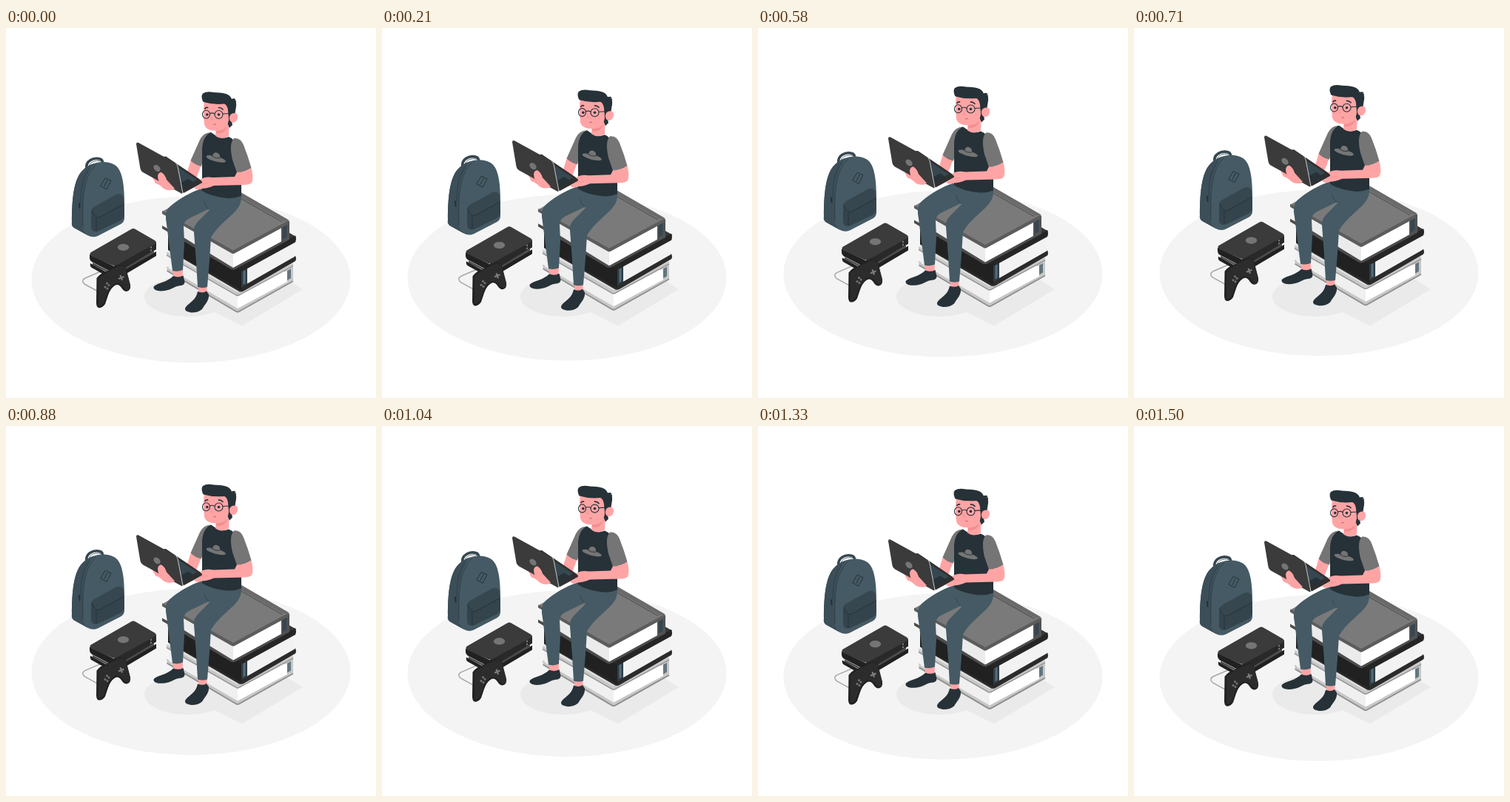
An HTML page that plays this animation: 500 px wide and 500 px high, repeating every 1.54 s.

```html
<!DOCTYPE html>
<html lang="en">
<head>
<meta charset="utf-8">
<title>Reader on a stack of books</title>
<style>
  html, body { margin: 0; width: 100%; height: 100%; overflow: hidden; background: #fff; }
  svg { display: block; width: 100%; height: 100%; }
  .ink { fill: #263238; }
  .skin { fill: #ffa4a5; }
  .denim { fill: #455a64; }
  .slate { fill: #37474f; }
  .grey { fill: #757575; }
  .line { fill: none; stroke: #263238; stroke-linecap: round; stroke-linejoin: round; }
</style>
</head>
<body>
<svg viewBox="0 0 500 500">
  <g class="float"><ellipse cx="250" cy="340" rx="215.5" ry="112.3" fill="#f4f4f4"/></g>

  <g fill="#eaeaea">
    <ellipse cx="245" cy="363" rx="58" ry="27"/>
    <path d="M270 378 L319 402.500 L401 353 L380 340 L290 340Z"/>
  </g>

  <g class="float">
    <g id="backpack">
      <path class="line" d="M109 190 C107 180 118 174.500 127 177 Q131 178 131 185" style="stroke:#37474f;stroke-width:3.600"/>
      <path class="line" d="M112 188 C112 181 121 178 128 180" style="stroke:#607078;stroke-width:1"/>
      <path class="denim" d="M89 262 C89 234 91 205 103 193 C115 180 135 178 147 185 C158 192 160 214 160 238 L160 257 Q160 262 155 265 L124 281 Q117 284 110 280 L92 270 Q88 267 89 262Z"/>
      <path d="M89 262 C89 234 91 205 103 193 Q110 186 119 183 C107 198 104 217 104 240 L104 269 Q105 277 112 281 L92 270 Q88 267 89 262Z" fill="#3c4e58"/>
      <path class="line" d="M104 268 C103 231 104 202 121 185 M101 237 C101 215 104 201 113 190" stroke-width=".9" style="stroke:#2e3e47"/>
      <path class="line" d="M99 237 L99.500 243" stroke-width="2.200"/>
      <path d="M115 251 Q115 245 120 242 L149 226 Q157 223 159 229 L160 251 Q160 257 155 260 L126 274 Q116 278 115 269Z" fill="#34444c"/>
      <path class="slate" d="M115 247 Q116 243 120 241 L149 225 Q157 222 159 231 L159 238 L127 255 Q122 257 119 252Z"/>
      <path class="line" d="M116 247 Q121 260 128 255 L159 238 M122 258 L122 274" stroke-width="1"/>
      <path class="line" d="M134.500 203 L142 206.500 L136 218 L128 213.500Z M137 206 L133 214" stroke-width="1"/>
    </g>

    <g id="console">
      <path class="line" d="M128 329 L107 338 Q101 341 106 346 L126 357" style="stroke:#a6a6a6;stroke-width:1.500"/>
      <path d="M114 318 L145 335 L203 302 L203 308 L149 340 Q145 341 141 338 L116 324 Q113 322 114 318Z" fill="#212121"/>
      <path d="M117 317 L146 332 L200 301 L200 304 L147 335 L117 320Z" fill="#4a4a4a"/>
      <path d="M113 306 L146 322 L203 290 L203 299 L149 331 Q146 332 143 330 L116 316 Q113 314 113 311Z" fill="#212121"/>
      <path d="M146 321 L203 290 L203 299 L149 331 L146 331Z" fill="#292929"/>
      <path d="M115 303 L169 272 Q172 270 175 272 L201 287 Q205 290 201 292 L150 320 Q146 322 142 320 L115 308 Q112 305 115 303Z" fill="#3b3b3b"/>
      <ellipse cx="158.500" cy="296.300" rx="7.700" ry="4.600" class="grey"/>
      <path d="M195 296 l2 -1 v2 l-2 1z m0 4 l2 -1 v2 l-2 1z" fill="#858585"/>
    </g>

    <g id="gamepad">
      <path d="M122.500 338 Q128 331 134 330 L151 321 Q159 318 162 324 L168 347 Q169 355 163 356 Q159 356 156 351 Q152 345 147 348 Q141 352 138 361 L134 373 Q130 379 125 378 Q122 377 122 371Z" fill="#212121"/>
      <path d="M125 338 Q138 328 152 322 Q160 319 162 326 L167 345 Q169 352 164 354 Q160 353 157 348 Q151 343 146 346 Q139 351 136 360 L132 371 Q129 376 125 375Z" fill="#2c2c2c"/>
      <path d="M152 339 L159.500 336 M154.500 334 L157 341" stroke="#7d7d7d" stroke-width="2.200"/>
      <g class="grey">
        <circle cx="136.500" cy="345" r="1.500"/><circle cx="134" cy="350" r="1.500"/>
        <circle cx="139" cy="347.500" r="1.500"/><circle cx="137" cy="352" r="1.500"/>
      </g>
    </g>

    <g id="books">
      <!-- bottom -->
      <path d="M217 322 L313 378 L388 338 L388 343 L315 384 Q313 385 311 384 L218 329Z" fill="#c7c7c7"/>
      <path d="M217.500 328 L311 383 Q313 384 315 383 L388 342" fill="none" stroke="#8f8f8f" stroke-width="1.800"/>
      <path d="M220 310 L313 361 V379 L220 325Z" fill="#f0f0f0"/>
      <path d="M313 361 L380 325 V343 L313 379Z" fill="#fff"/>
      <path d="M376 324 L388 318 V341 L380 345 V340 L384 336 V326 L376 330Z" fill="#c7c7c7"/>
      <path d="M380 328 L385 325.500 V338 L380 341Z" fill="#64757e"/>
      <path d="M217 303 L292 265 L388 319 L313 358Z" fill="#e0e0e0"/>
      <path d="M217 303 L313 357 L388 318 V322 L315 361.500 Q313 362.500 311 361.500 L217 308Z" fill="#c7c7c7"/>
      <path d="M217 307 L311 361 Q313 362 315 361 L388 321.500" fill="none" stroke="#949494" stroke-width="1.400"/>
      <!-- middle -->
      <path d="M219 294 L318 346 L391 308 Q393 312 391 315 L321 355.500 Q318 357 315 356 L219 300Z" fill="#2b2b2b"/>
      <path d="M326 323 L390 288 Q387 298 390 309 L326 345.500Z" fill="#f2f2f2"/>
      <path d="M219 270 L318 326 V354 L219 299Z" fill="#212121"/>
      <path d="M318 326 L326 322 V346 L318 351Z" fill="#2f3d44"/>
      <path d="M320.500 328 L323.500 327 V345 L320.500 347Z" fill="#546e7a"/>
      <path d="M219 267 L293 226 L392 282 L318 322Z" fill="#383838"/>
      <path d="M219 267 L318 321 L391 280.500 Q393 285 391 289.500 L320 328.500 Q318 329.500 316 328 L219 273Z" fill="#262626"/>
      <!-- top -->
      <path d="M211 267 L307 320 L383 281 V286 L310 326 Q307 327.500 304 326 L211 271Z" fill="#4c4c4c"/>
      <path d="M217 253 L307 304 V324 L217 269Z" fill="#ebebeb"/>
      <path d="M307 304 L373 267 V288 L307 324Z" fill="#fff"/>
      <path d="M372 267 L383 261 V285 L372 290Z" fill="#4f5356"/>
      <path d="M374 268 L379.500 265 V282 L374 286Z" fill="#37474f"/>
      <path d="M211 248 L287 207 L381 260 Q383 261 381 263 L307 302Z" fill="#7a7a7a"/>
      <path d="M291 214 L375 261 L383 260 L300 212Z" fill="#6a6a6a"/>
      <path d="M300 220.500 L373 262" stroke="#555" stroke-width="1.200"/>
      <path d="M211 247 L307 300.500 L381 260.500 Q384 261 383 264.500 L309 304.500 Q307 305.500 305 304.500 L211 251Z" fill="#5c5c5c"/>
    </g>

    <g id="legs">
      <path class="skin" d="M225 326 H239 L238.500 338 H227Z M259 346 H272 L271 359 H261Z"/>
      <path class="ink" d="M226 335 Q233 338 239.500 334.500 L241.500 343 Q241.500 347 237 348 C230 348 226 352 219 354 Q211 356.500 203 354.500 Q198 352 200 349 C206 344 219 343 226 335Z"/>
      <path class="ink" d="M259 356 Q266 359 271 355.500 L274 360 C275 368 269 373 265 380 Q259 385 250 384.500 Q241 383 242 379 C246 371 256 370 259 356Z"/>
      <path class="denim" d="M265 217 C249 221 226 236 219 244 Q214 250 217 265 L225 328 Q232 330 239 327 L241 290 L240 268 Q240 261 248 257 L275 244 L318 230 V218Z"/>
      <path class="denim" d="M318 225 C319 241 311 247 298 259 Q283 272 277 283 L275 314 L272 350 Q266 352 259 350 L257 316 L254 276 Q253 268 260 261 L275 246 L268 228Z"/>
      <path class="line" d="M267.500 234 Q269 241 274 245" style="stroke:#37474f;stroke-width:1"/>
    </g>

    <g id="torso">
      <path class="skin" d="M250 178 L245 194 Q246 201 257 203 L264 185Z"/>
      <path class="grey" d="M277 141 Q267 141 262 151 L249.500 179 Q255 185 264 187 L270 165Z"/>
      <path class="ink" d="M283 145 Q291 151 301 147 Q310 150 314 164 L318 190 V227 Q306 232 291 229 Q274 226 265 220 V163 Q266 146 277 141Z"/>
      <path class="grey" d="M308 149 Q317 148 321 158 Q327 173 331.500 189 Q324 194.500 312 195.500 L306 178 Q301 156 308 149Z"/>
      <g transform="rotate(15 284 176)">
        <ellipse cx="284" cy="177" rx="13.500" ry="3.500" class="grey"/>
        <path class="grey" d="M278.500 174 Q278.500 168.500 283 168.500 Q288 168.500 288.500 174Z"/>
        <path d="M277 174.500 Q283 177 289 174.500" stroke="#263238" stroke-width=".8" fill="none"/>
      </g>
    </g>

    <g id="head">
      <path class="skin" d="M284 130 L302 124 L301 146 Q292 152 283 146Z"/>
      <path d="M284 138 Q295 139 300 132 Q295 145 284 142Z" fill="#f28f8f"/>
      <path class="ink" d="M299 98 H311 L309 116 L305 126 L306 131 L302 135 L299 128Z"/>
      <path class="skin" d="M268 98 Q284 94 300 101 L301 124 Q299 138 285 139 Q270 139 268 130 Q266 113 268 98Z"/>
      <ellipse cx="307.500" cy="121" rx="5.500" ry="6.800" class="skin" transform="rotate(18 307.500 121)"/>
      <path class="ink" d="M266 99 Q263 92 266 88.500 Q271 85 281 87 C293 87.500 302 88 305 96 Q308 94.500 310.500 96.500 L308 99 Q312 99 311 106 L309.500 115 Q303 115 301 120 L300 111 Q299 104 295 102.500 Q280 104 267 100Z"/>
      <path class="line" d="M269 109 Q270 107 272.500 107.500 M287.500 107.500 Q291 107.500 293 110" stroke-width="1.700"/>
      <g class="line" stroke-width="1.100">
        <ellipse cx="270.500" cy="116.800" rx="5" ry="5.500"/>
        <circle cx="287.500" cy="117" r="5.500"/>
        <path d="M275.500 115.500 Q279 114 282 116 M293 116 L303 115.500"/>
      </g>
      <circle cx="271.800" cy="117" r="1.800" class="ink"/><circle cx="287.500" cy="117" r="1.800" class="ink"/>
      <path d="M278 118 L276 124 Q278 126 280 124Z" fill="#f99a9c"/>
      <path d="M280 130.500 Q282 129.500 284 130.500" stroke="#c4686c" stroke-width="1" fill="none"/>
    </g>

    <g id="laptop">
      <path d="M212 174 L216 173.500 L264 206 Q267 208 264 210 L240 223 L229 210Z" fill="#303030"/>
      <path d="M231 187 L258 205 L244 213 L237 210Z" fill="#37474f"/>
      <path d="M235 210 L246 204 L254 209 L240 217Z" fill="#263238"/>
      <path class="skin" d="M312 195 Q323 195 331.500 189 Q335 203 332 209 Q329 212 322 212 L281 213 Q272 217 264 217 Q258 220 254 216 L264 210 Q267 208 262 205 Q268 200 280 202 L309 201Z"/>
      <path class="line" d="M262 211 L273 210" style="stroke:#f28f8f;stroke-width:.8"/>
      <path class="skin" d="M197 200 L205 196 L229 218 Q219 221 213 217 Q207 211 202 210Z"/>
      <path d="M176 157 Q176 154 179 155 L229 182.500 Q231 183.500 232 187 L239 222 Q239 225 236 223 L185 195 Q182 193 181.500 190Z" fill="#3b3b3b"/>
      <path d="M229.500 183 Q231.500 184.500 232 187 L239 223" fill="none" stroke="#c9c9c9" stroke-width="1"/>
      <ellipse cx="204" cy="189.500" rx="5.300" ry="3.700" transform="rotate(42 204 189.500)" class="grey"/>
      <path class="skin" d="M205 200 Q206 195 210 195 Q215 198 217 205 L228 217 Q222 221 214 217 Q205 209 205 200Z"/>
    </g>
  </g>
</svg>
<script>
  const LOOP = 1540, STEPS = 37, LIFT = 10;
  const layers = document.querySelectorAll('.float');

  // Linear bob: the lowest point falls on the last step of the loop.
  function draw(now) {
    const step = Math.floor((now % LOOP) / LOOP * STEPS + 0.1);
    const phase = ((step + 1) % STEPS) / STEPS;
    const rise = LIFT * (1 - Math.abs(1 - 2 * phase));
    const y = LIFT * 2 / STEPS - rise;
    for (const layer of layers) layer.setAttribute('transform', `translate(0 ${y})`);
  }

  const start = performance.now();
  function tick() {
    draw(performance.now() - start);
    requestAnimationFrame(tick);
  }
  tick();
</script>
</body>
</html>
```
